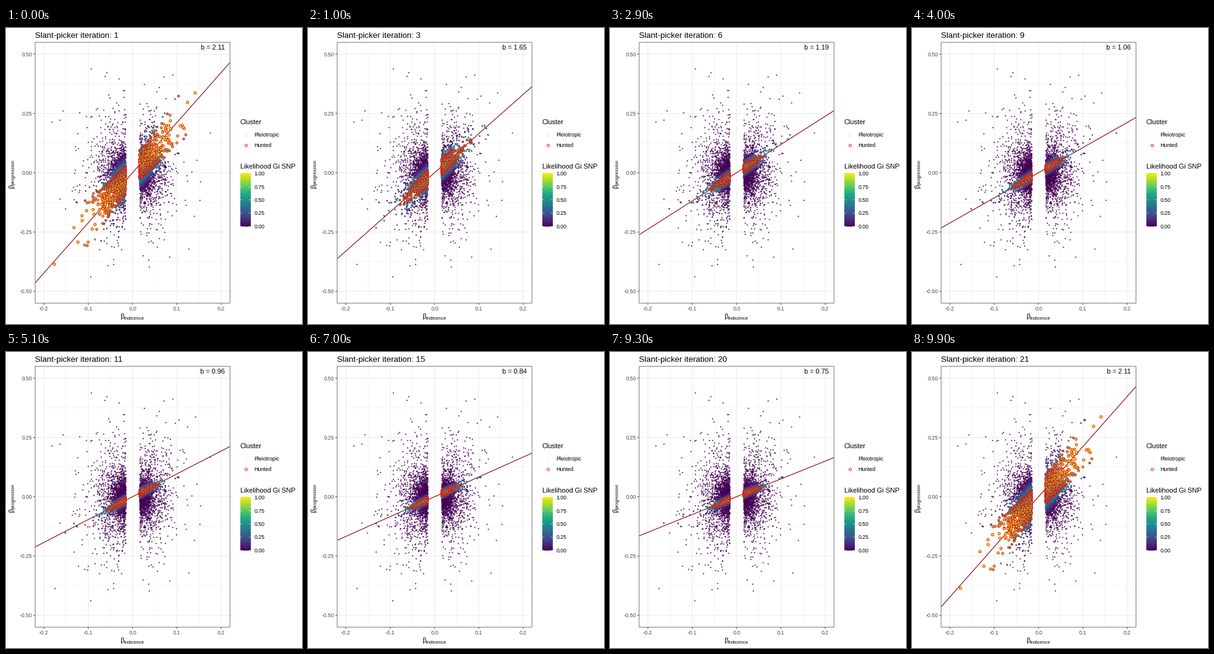
Recreate the animation shown at these times as a matplotlib script. Size 480 by 480 pixels, loop 10000 ms.

```python
import numpy as np
import matplotlib.pyplot as plt
from matplotlib.animation import FuncAnimation
from matplotlib.patches import Rectangle

plt.rcParams["font.family"] = "Liberation Sans"
SIZE, FRAMES, ITERATIONS = 480, 100, 21
LEFT, RIGHT, TOP, BOTTOM = 47.2, 363.2, 23.2, 446.2
GRID, DARK, TICK_TEXT = "#EBEBEB", "#333333", "#4D4D4D"
VIRIDIS = plt.get_cmap("viridis")


def px(x):
    return 205.2 + 718.5 * x


def py(y):
    return 234.7 - 384.6 * y


def slope_at(state):
    """Fitted slope, converging as the sum of a slow and a fast decay."""
    return 0.66 + 1.156 * 0.874 ** state + 0.296 * 0.6 ** state


def change_frame(k):
    """Frame of the k-th change: every five frames, later every four."""
    return min(5 * k - 1 - k // 11, 4 * k + 15)


CHANGES = [change_frame(k) for k in range(1, ITERATIONS + 1)]


def changes_until(frame):
    return int(np.searchsorted(CHANGES, frame, "right"))


def make_points(rng):
    def group(n, x_spread, y_spread, slope=0.0):
        x = 0.0158 + np.abs(rng.normal(0, x_spread, n))
        y = slope * x + rng.normal(0, y_spread, n)
        return rng.choice([-1, 1], (n, 1)) * np.column_stack([x, y])

    cloud = np.vstack([
        group(1500, 0.013, 0.036), group(1300, 0.024, 0.070),
        group(900, 0.036, 0.120), group(220, 0.070, 0.210),
        group(130, 0.038, 0.040, 1.95)])
    x, y = np.abs(cloud).T
    cloud = cloud[(x < 0.19) & (y < 0.5)]
    rng.shuffle(cloud)
    return cloud


DATA = make_points(np.random.default_rng(12))
DATA_X, DATA_Y = DATA.T
POINTS = np.column_stack([px(DATA_X), py(DATA_Y)])


def likelihood(state):
    """Membership probability: a band around the line that tightens."""
    height = 0.9 + 0.3 * 0.6 ** state
    width = 0.009 + 0.030 * 0.76 ** state
    spread = -230 + 510 * 0.45 ** state
    offset = (DATA_Y - slope_at(state) * DATA_X) / width
    logit = height - offset ** 2 / 2 + spread * np.minimum(DATA_X ** 2, 0.01)
    return 1 / (1 + np.exp(-np.clip(logit, -30, 30)))


fig = plt.figure(figsize=(SIZE / 72, SIZE / 72), dpi=72, facecolor="white")
ax = fig.add_axes([0, 0, 1, 1])
ax.axis("off")


def line(x, y, color, width, z=1):
    return ax.plot(x, y, color=color, lw=width, zorder=z, snap=False,
                   solid_capstyle="butt")[0]


def label(x, y, text, size, color="black", ha="left", **kw):
    return ax.text(x, y, text, fontsize=size, color=color, ha=ha,
                   va="baseline", zorder=10, **kw)


def draw_panel():
    for i in range(-2, 3):
        x, y = px(0.1 * i), py(0.25 * i)
        if i < 2:
            line([px(0.1 * i + 0.05)] * 2, [TOP, BOTTOM], GRID, 0.5)
            line([LEFT, RIGHT], [py(0.25 * i + 0.125)] * 2, GRID, 0.5)
        line([x, x], [TOP, BOTTOM], GRID, 1)
        line([LEFT, RIGHT], [y, y], GRID, 1)
        line([x, x], [BOTTOM, BOTTOM + 2.75], DARK, 1)
        line([LEFT - 2.75, LEFT], [y, y], DARK, 1)
        label(x, 458, f"{0.1 * i:.1f}", 8.8, TICK_TEXT, "center")
        label(42.5, y + 3.2, f"{0.25 * i:.2f}", 8.8, TICK_TEXT, "right")
    ax.add_patch(Rectangle((LEFT, TOP), RIGHT - LEFT, BOTTOM - TOP, lw=1,
                           fill=False, ec="#777777", zorder=8, snap=False))
    label(185.6, 471, "β", 11)
    label(191.8, 473, "indicence", 7.7)
    label(14, 258.4, "β", 11, rotation=90, ha="right")
    label(16, 252.2, "progression", 7.7, rotation=90, ha="right")


def draw_legend():
    label(379.7, 156.4, "Cluster", 11)
    for y, name, color in ((172.8, "Pleiotropic", "#F0EEF4"),
                           (189.8, "Hunted", "red")):
        ax.plot([388.6], [y], "o", ms=4, mfc="white", mec=color, mew=0.9)
        label(402.5, y + 3.2, name, 8.8)
    label(379.7, 228.4, "Likelihood Gi SNP", 11)
    ax.imshow(np.linspace(1, 0, 256)[:, None], cmap=VIRIDIS, aspect="auto",
              extent=(379.8, 396.4, 322, 235.6), zorder=2)
    for value in np.linspace(0, 1, 5):
        y = 321.6 - 85.6 * value
        line([379.8, 383.2], [y, y], "white", 0.5, 3)
        line([393.4, 396.8], [y, y], "white", 0.5, 3)
        label(402.5, y + 3.2, f"{value:.2f}", 8.8)


draw_panel()
draw_legend()
title = label(47, 16, "", 13.2)
slope_text = label(335, 35, "", 11, ha="center")
fit = line([LEFT, RIGHT], [0, 0], "#8B0000", 1.1, 3)
ax.plot(*POINTS.T, "o", ms=1.95, mfc=VIRIDIS(0.0), mec="none", zorder=4)
likely = ax.scatter([], [], linewidths=0, zorder=5)
hunted = ax.scatter([], [], linewidths=0.75, zorder=6)
ax.set(xlim=(0, SIZE), ylim=(SIZE, 0))


def update(frame):
    state = changes_until(frame) % ITERATIONS
    p = likelihood(state)
    inside = p > 0.5
    for marks, mask, growth in ((likely, (p > 0.03) & ~inside, 1.5),
                                (hunted, inside, 2.4)):
        marks.set_offsets(POINTS[mask])
        marks.set_facecolor(VIRIDIS(p[mask]))
        marks.set_sizes((1.9 + growth * p[mask]) ** 2)
    hunted.set_edgecolor("red")

    slope = slope_at(state)
    fit.set_ydata([py(-0.22 * slope), py(0.22 * slope)])
    slope_text.set_text(f"b = {slope:.2f}")
    # The heading follows one step after the data.
    title.set_text(f"Slant-picker iteration: {changes_until(frame - 1) + 1}")
    return title, slope_text, fit, likely, hunted


anim = FuncAnimation(fig, update, frames=FRAMES, interval=100, repeat=True,
                     repeat_delay=0, blit=False)
plt.show()
```
